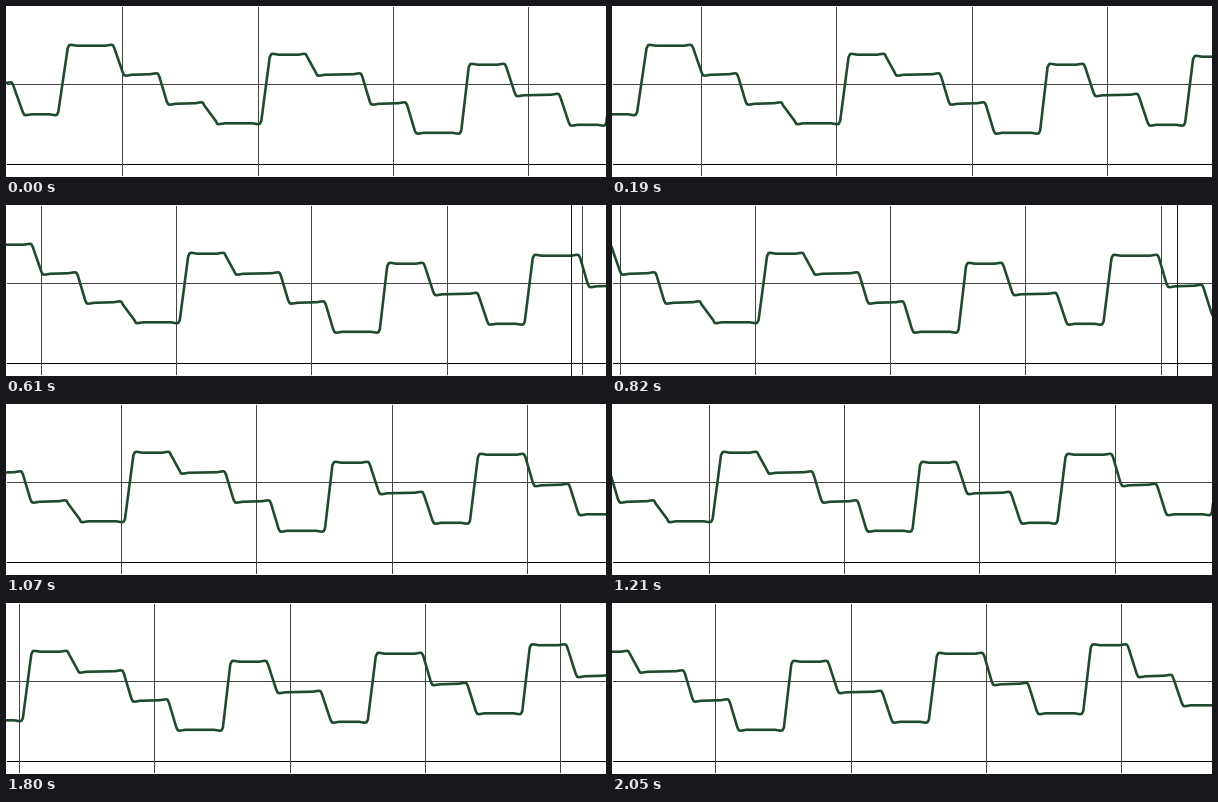
A matplotlib script for the animation above (2070 ms loop, 600 by 171 pixels).

```python
import numpy as np
import matplotlib.pyplot as plt
from matplotlib.animation import FuncAnimation
from matplotlib.patches import FancyBboxPatch

W, H, DPI = 600, 171, 100
LOOP, TICK = 2070, 10
PX = 72 / DPI
GRID_X, GRID_STEP = 115.4, 135.2

# Plateaus of the signal: left, right, height
LEVELS = [
    (-40, 6, 77), (17, 51, 107.5), (62, 107, 39.5), (117, 152, 68),
    (161, 197, 97), (210, 254, 116.5), (264, 300, 48.5), (310, 355, 68),
    (364, 400, 97), (409, 454, 126), (463, 499, 58.5), (509, 553, 88.5),
    (563, 599, 118), (608.5, 654.4, 50.5), (663.5, 699, 80.5),
    (708.4, 753.4, 109.5), (762.4, 798.5, 42), (808.4, 843.4, 72.5),
    (853.4, 930, 101.5),
]

# Moments at which the chart jumps left, and the distance covered
JUMPS = np.array([
    40, 110, 190, 260, 340, 410, 480, 560, 610, 680, 750, 820, 890, 930,
    1070, 1140, 1210, 1280, 1340, 1410, 1480, 1550, 1600, 1670, 1730, 1800,
    1850, 1900, 1950, 2000, 2050])
KEY_STEPS = [0, 6, 12, 17, 21, 26, 31]
KEY_SHIFT = [0, 54.3, 108.7, 154.7, 190.7, 238.4, 283.4]


def signal():
    """Stepped curve with a slight overshoot at every corner."""
    heights = np.array([y for _, _, y in LEVELS])
    turns = np.sign(np.diff(heights, prepend=0, append=0))
    points = []
    for (left, right, y), enter, leave in zip(LEVELS, turns, turns[1:]):
        points += [
            (left - 0.8, y - 2.2 * enter), (left + 0.7, y + 0.8 * enter),
            (left + 2, y + 1.2 * enter), (left + 4, y + 1.0 * enter),
            (left + 8, y + 0.3 * enter), (right - 8, y - 0.3 * leave),
            (right - 4, y - 1.0 * leave), (right - 2, y - 1.2 * leave),
            (right - 0.6, y - 0.8 * leave), (right + 0.8, y + 2.0 * leave),
        ]
    return np.array(points).T


def scroll(ms):
    step = np.searchsorted(JUMPS, ms, side="right")
    return np.interp(step, KEY_STEPS, KEY_SHIFT)


fig = plt.figure(figsize=(W / DPI, H / DPI), dpi=DPI, facecolor="white")
ax = fig.add_axes([0, 0, 1, 1])
ax.set_xlim(0, W)
ax.set_ylim(H, 0)
ax.axis("off")


def rule(xs, ys, color, dotted=True):
    style = (0, (1, 1)) if dotted else "-"
    return ax.plot(xs, ys, color=color, lw=PX, ls=style, antialiased=False,
                   dash_capstyle="butt", solid_capstyle="butt", zorder=1)[0]


rule([1, W], [77.5, 77.5], "#444444")
rule([1, W], [157.5, 157.5], "#000000")
columns = [rule([0, 0], [1, 170], "#444444") for _ in range(5)]

curve_x, curve_y = signal()
curve, = ax.plot([], [], color="#1f4a2d", lw=2.6 * PX, zorder=2,
                 solid_joinstyle="round", solid_capstyle="round")
crosshair = rule([564.5, 564.5], [0, H], "#111111", dotted=False)
crosshair.set_zorder(3)

tip = FancyBboxPatch((585, 33), 40, 17, boxstyle="round,pad=2,rounding_size=2",
                     fc="#cccccc", ec="none", zorder=4)
ax.add_patch(tip)
tip_text = ax.text(585.5, 42, "Has", size=12 * PX, family="Liberation Sans",
                   color="#333333", va="center", zorder=5)


def draw(frame):
    ms = frame * TICK
    shift = scroll(ms)
    curve.set_data(curve_x - shift + 0.5, curve_y + 0.5)
    first = (GRID_X - shift) % GRID_STEP
    for k, column in enumerate(columns):
        x = np.floor(first + k * GRID_STEP + 0.5) + 0.5
        column.set_xdata([x, x])
    crosshair.set_visible(610 <= ms < 1070)
    for part in (tip, tip_text):
        part.set_visible(390 <= ms < 560)
    return [curve, crosshair, tip, tip_text, *columns]


anim = FuncAnimation(fig, draw, frames=LOOP // TICK, interval=TICK,
                     repeat=True, repeat_delay=0, blit=False)
plt.show()
```
